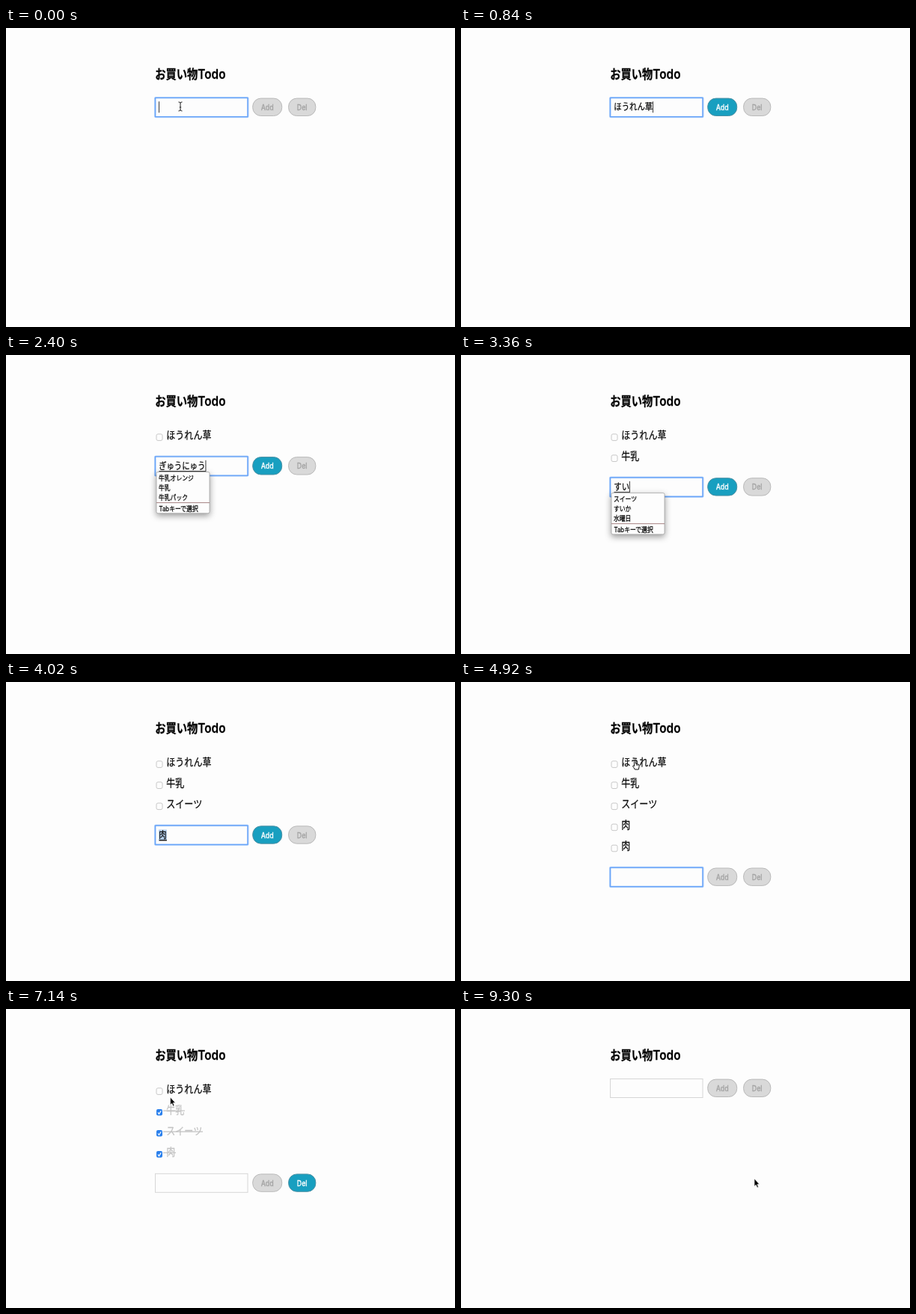
Animation of 600x400 px, one loop 9720 ms. Source, as an HTML page:

```html
<!DOCTYPE html>
<html lang="ja">
<head>
<meta charset="utf-8">
<title>お買い物Todo</title>
<style>
  html, body { margin: 0; width: 100%; height: 100%; overflow: hidden; background: #fdfdfd; }
  svg { display: block; width: 600px; height: 400px; }
  text { font-family: Inter, "Noto Sans CJK JP", "Noto Sans CJK", sans-serif; white-space: pre; }
  .popup { filter: drop-shadow(0 3px 4px rgba(0, 0, 0, .4)); }
</style>
</head>
<body>
<svg id="stage" viewBox="0 0 600 400"></svg>
<script>
const LOOP = 9720, STEP = 60;
const ASPECT = .86; // the screen is shown slightly narrowed
const ROW = 28.1;
const PAPER = '#fdfdfd', INK = '#0a0a0a', FAINT = '#c2c2c2';

// One entry per step: plain = composing, * = converted, = confirmed, + added to the list, _ empty
const RUNS = [
  [60, 'ｈ ほ ほう ほうｒ ほうれ ほうれｎ ほうれん ほうれんｓ ほうれんそ ほうれんそう ほうれんそう *ほうれん草 *ほうれん草 =ほうれん草 +ほうれん草'],
  [1080, 'ｂ び びー びーｒ びーる びーる びー びー び び _ ｇ ｇｙ ｇｙ ぎゅ ぎゅう ぎゅうｎ ぎゅうｎｙ ぎゅうにゅ ' +
    'ぎゅうにゅう ぎゅうにゅう ぎゅうにゅう ぎゅうにゅう *牛乳 =牛乳 +牛乳'],
  [3240, 'ｓ す すい すいー すいーｔ すいーつ *スイーツ =スイーツ +スイーツ'],
  [3780, 'ｎ に にｋ にく *肉 *肉 =肉 +肉'],
  [4320, 'ｎ に にｋ にく *肉 =肉 +肉']
].map(([start, words]) => ({ start, words: words.split(' ') }));

const HINTS = {
  ほ: ['ほうれん草', '方法', '本'],
  び: ['ビール', 'ビルド', 'ビッグエンディアン'],
  ぎ: ['牛乳オレンジ', '牛乳', '牛乳パック'],
  す: ['スイーツ', 'すいか', '水曜日'],
  に: ['肉', '日本', '肉じゃが']
};

// Row index to tick, or -1 to delete the ticked rows
const CLICKS = [[5640, 4], [6240, -1], [6420, 1], [6540, 2], [6720, 3], [7320, 0], [8580, -1]];
const BLUR = CLICKS[0][0];

const MOUSE = [
  [4920, 232.5, 105], [5340, 208, 195], [5580, 204, 218], [5820, 204, 218],
  [6120, 392, 257], [6240, 393, 258], [6420, 204, 135], [6540, 204, 163],
  [6660, 204, 189], [6720, 204, 189], [6840, 206, 182], [7020, 216, 145],
  [7140, 219.5, 118], [7260, 202, 105], [7980, 202, 105], [8460, 388, 224], [8520, 392, 227]
];

function stateAt(t) {
  let items = [], word = '', mode = '';
  for (const { start, words } of RUNS) {
    if (t < start) break;
    const now = words[Math.min(words.length - 1, (t - start) / STEP)];
    mode = /[*=+_]/.test(now[0]) ? now[0] : '';
    word = mode ? now.slice(1) : now;
    if (mode === '+') {
      items.push({ name: word, done: false });
      word = '';
    }
  }
  for (const [at, row] of CLICKS) {
    if (t < at) break;
    if (row < 0) items = items.filter(item => !item.done);
    else items[row].done = true;
  }
  return { items, word, mode };
}

function mouseAt(t) {
  const next = MOUSE.findIndex(m => m[0] > t);
  if (next === 0) return t < STEP ? [233, 105] : null;
  if (next < 0) return MOUSE[MOUSE.length - 1].slice(1);
  const a = MOUSE[next - 1], b = MOUSE[next];
  const k = (t - a[0]) / (b[0] - a[0]);
  return [a[1] + (b[1] - a[1]) * k, a[2] + (b[2] - a[2]) * k];
}

const text = (x, y, size, str, fill = INK, extra = '') =>
  `<text transform="translate(${x} ${y}) scale(${ASPECT} 1)" font-size="${size}" fill="${fill}" stroke="${fill}" stroke-width=".25" ${extra}>${str}</text>`;
const rect = (x, y, w, h, fill, extra = '') =>
  `<rect x="${x}" y="${y}" width="${w}" height="${h}" fill="${fill}" ${extra}/>`;
const line = (x1, y, x2, stroke, width = 1) =>
  `<path d="M${x1} ${y}H${x2}" stroke="${stroke}" stroke-width="${width}"/>`;

function drawItem({ name, done }, i) {
  const y = 107 + ROW * i;
  const ink = done ? FAINT : INK;
  const box = done
    ? rect(201, y - 1.2, 8, 8.6, '#2b80ec', 'rx="2"') +
      `<path d="M203 ${y + 3.3}l1.5 2 2.7-4.2" fill="none" stroke="#fff" stroke-width="1.2"/>`
    : rect(201, y - 1.2, 8, 8.6, PAPER, `rx="2" stroke="${FAINT}" stroke-width=".9"`);
  return box + text(214.3, y + 5, 14, name, ink) +
    (done ? line(210, y + 1, 215 + name.length * 12, ink, 1.2) : '');
}

function drawButton(x, y, w, label, on) {
  return rect(x, y - 11.7, w, 23.4, on ? '#189fc0' : '#d9d9d9',
      `rx="11" stroke="${on ? '#4a8fa3' : '#b9b9b9'}" stroke-width="1"`) +
    text(x + w / 2, y + 4, 10.2, label, on ? '#fff' : '#a4a4a4', 'text-anchor="middle" font-weight="500"');
}

function drawPopup(y, words, tagged) {
  const w = tagged ? 123.5 : 71;
  const rows = words.map((word, i) => {
    const base = y + 19.3 + 13.3 * i;
    return text(204, base, 9.1, word) +
      (tagged ? text(319.5, base, 8.5, '[全] カタカナ', '#969696', 'text-anchor="end"') : '');
  });
  return rect(201, y + 8.2, w, 55.3, PAPER, 'class="popup" rx="2" stroke="#a4a4a4" stroke-width=".8"') +
    rows.join('') + line(201, y + 49.3, 201 + w, '#9c7474', .9) +
    text(204.5, y + 60.3, 9.1, 'Tabキーで選択');
}

function drawInput(y, word, mode, t) {
  const focused = t < BLUR;
  const end = 204.5 + word.length * 10.4;
  let out = focused
    ? rect(198.6, y - 13.2, 125.3, 27, 'none', 'rx="2" stroke="#b4d2fc" stroke-width="1.4"') +
      rect(199.6, y - 12.3, 123.3, 25.2, PAPER, 'stroke="#69a5f8" stroke-width="1.5"')
    : rect(199.5, y - 12.3, 123.5, 25, PAPER, 'stroke="#d6d6d6" stroke-width="1"');
  if (mode === '*') out += rect(204, y - 7, end - 204, 14, '#b5d0ee');
  out += text(204.3, y + 4.6, 12.1, word);
  if (word && mode !== '=') out += line(204.5, y + 7.2, end, '#222', mode ? 1.6 : .9);
  const hidden = (t >= 2820 && t < 3000) || t >= 4920;
  if (!hidden && mode !== '*') out += rect(end - .4, y - 7.5, .9, 15, '#222');
  return out;
}

const SHAPES = {
  beam: '<path d="M-2.5-6Q0-6 0-4.5Q0-6 2.5-6M0-4.8V4.8M-2.5 6Q0 6 0 4.5Q0 6 2.5 6M-1.2 1H1.2" fill="none" stroke="#222" stroke-width="1"/>',
  arrow: '<path d="M0 0V10.3L2.2 8.2 3.8 12 5.4 11.3 3.9 7.6H6.8Z" fill="#000" stroke="#fff" stroke-width=".6"/>',
  hand: '<path d="M-1 1Q0-.7 1 1V4.3L4.7 5.2Q6 5.6 5.7 7.5L4.8 12H-.2Q-1.5 9.5-3 7.6-2.4 6.2-1 7.5Z" fill="#fff" stroke="#111" stroke-width="1"/>' +
    '<path d="M2.3 5V7M3.9 5.3V7.2" stroke="#111" stroke-width=".7"/>'
};

function drawMouse(t, items, formY) {
  const at = mouseAt(t);
  if (!at) return '';
  const [x, y] = at;
  const overRow = items.some(({ name }, i) =>
    Math.abs(y - 107 - ROW * i) < 9.5 && x > 199 && x < 215 + name.length * 12);
  const overDel = items.some(i => i.done) && x > 378 && x < 414 && Math.abs(y - formY) < 12;
  const shape = t < STEP ? 'beam' : overRow || overDel ? 'hand' : 'arrow';
  return `<g transform="translate(${x} ${y})">${SHAPES[shape]}</g>`;
}

function draw(t) {
  const { items, word, mode } = stateAt(t);
  const formY = items.length ? 148.3 + ROW * (items.length - 1) : 105.8;
  const hints = !mode && HINTS[word[0]];
  return text(199.3, 68, 16.6, 'お買い物<tspan font-size="17.8" font-weight="600">Todo</tspan>', '#000', 'font-weight="700"') +
    items.map(drawItem).join('') +
    drawInput(formY, word, mode, t) +
    drawButton(329.7, formY, 39, 'Add', word !== '') +
    drawButton(377.6, formY, 36.2, 'Del', items.some(i => i.done)) +
    (hints ? drawPopup(formY, hints, word[0] === 'び') : '') +
    drawMouse(t, items, formY);
}

const stage = document.getElementById('stage');
const begin = performance.now();
let shown = -1;

function tick() {
  const t = Math.floor((performance.now() - begin) % LOOP / STEP) * STEP;
  if (t !== shown) {
    stage.innerHTML = draw(t);
    shown = t;
  }
  requestAnimationFrame(tick);
}
tick();
</script>
</body>
</html>
```
